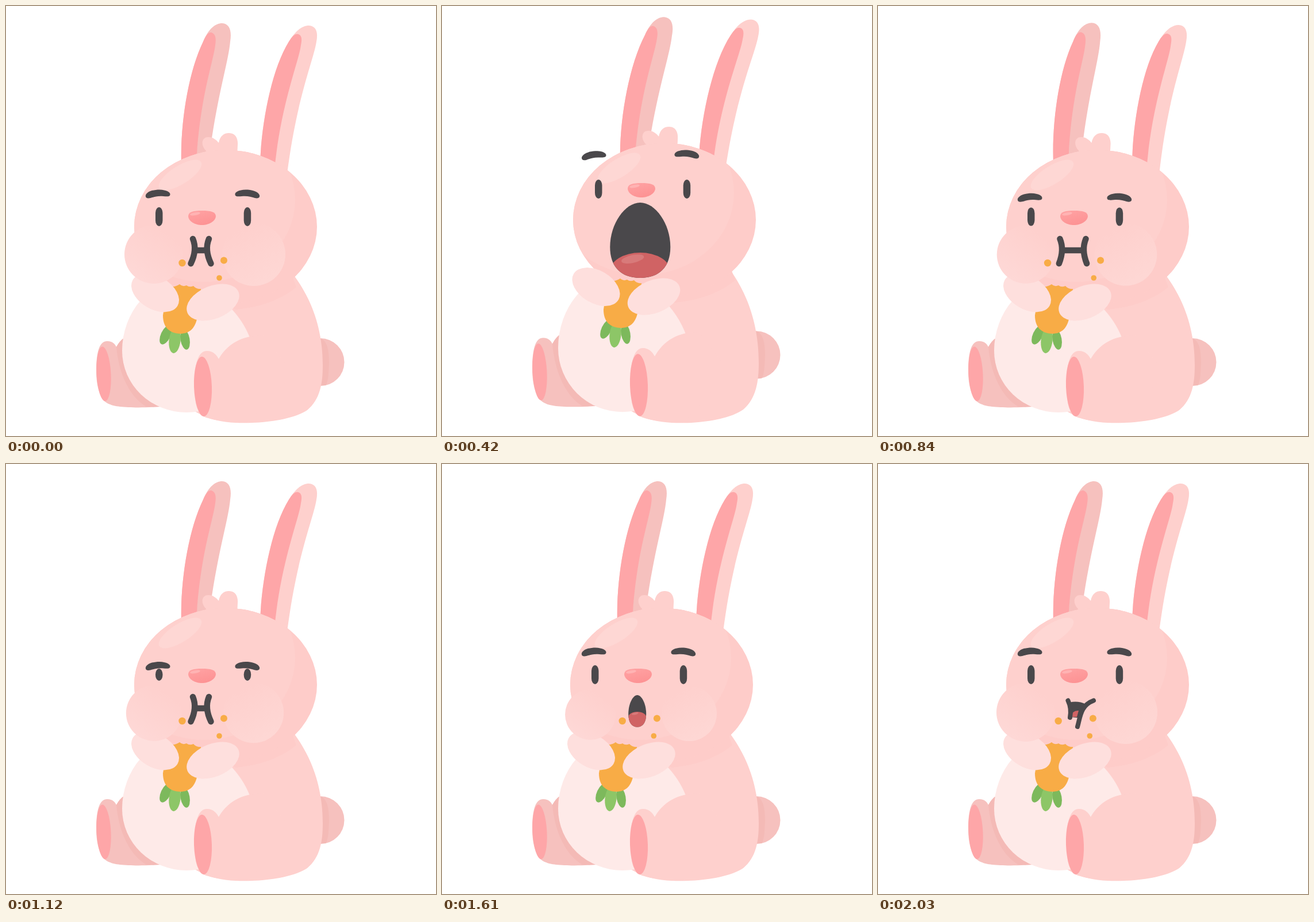
Animation of 748x748 px, one loop 2.1 s. Source, as an HTML page:

```html
<!DOCTYPE html>
<html lang="en">
<head>
<meta charset="utf-8">
<title>Rabbit eating a carrot</title>
<style>
  html, body { margin: 0; width: 100%; height: 100%; overflow: hidden; background: #fff; }
  svg { display: block; width: 100%; height: 100%; }
  .skin { fill: #fed0cd; }
  .shade { fill: #feccc9; }
  .back { fill: #f6c1be; }
  .backShade { fill: #f4bab6; }
  .pad { fill: #fea6a8; }
  .arm { fill: #fedfdd; }
  .ink { fill: #4a484b; }
  .line { fill: none; stroke: #4a484b; stroke-width: 10.5; stroke-linecap: round; stroke-linejoin: round; }
  .carrot { fill: #f8ac46; }
  .leaf { fill: #7db95c; }
  .tongue { fill: #d06364; }
</style>
</head>
<body>
<svg viewBox="0 0 748 748">
  <defs>
    <clipPath id="headClip"><ellipse cx="382" cy="384" rx="159" ry="133.5"/></clipPath>
    <clipPath id="eggClip"><path id="eggEdge"/></clipPath>
    <linearGradient id="cheekL" x1=".2" y1=".9" x2=".75" y2=".15">
      <stop offset="0" stop-color="#fed8d6"/><stop offset="1" stop-color="#fed0cd"/>
    </linearGradient>
    <linearGradient id="cheekR" x1=".7" y1=".9" x2=".3" y2=".1">
      <stop offset="0" stop-color="#fed7d4"/><stop offset="1" stop-color="#fed0cd"/>
    </linearGradient>
    <linearGradient id="noseFill" x1="0" y1="0" x2=".5" y2="1">
      <stop offset="0" stop-color="#ffa3a4"/><stop offset="1" stop-color="#fd9394"/>
    </linearGradient>
    <path id="brow" class="ink" d="M243 329C246 322 257 319.5 267 319.5C280 320 286 324 285.5 328C285 332 280 331.5 274 331C264 330 258 332 251 334C245 335.5 242 333 243 329Z"/>
  </defs>

  <g id="tail">
    <circle class="back" cx="547" cy="619.5" r="41.5"/>
    <path class="backShade" d="M547 578Q562 583 562 620Q561 655 556 660L535 659V580Z"/>
  </g>

  <g id="earL">
    <path class="back" d="M305 275C303 205 317 115 343 62C352 40 364 30 376 30C389 31 393 43 390 62C387 95 372 140 358 230L352 285Z"/>
    <path class="pad" d="M305 275C303 205 317 115 343 62Q350 45 357 46C364 48 366 55 364 68C360 100 337 160 331 275Z"/>
  </g>
  <g id="earR">
    <path class="skin" d="M442 275C444 205 462 110 492 62C504 42 516 34 527 34C540 35 543 46 540 62C535 95 505 160 488 300Z"/>
    <path class="pad" d="M442 275C444 205 462 110 492 62Q501 47 508 49C515 51 515 58 513 68C510 95 478 170 467 285Z"/>
  </g>

  <g id="body">
    <path class="back" d="M157 635C157 600 163 583 176 583C186 583 190 589 192 593Q198 582 206 577L290 640L270 697C225 700 190 698 181 693C163 688 157 660 157 635Z"/>
    <path class="backShade" d="M192 593Q198 582 206 577L290 640L270 697L244 697C215 680 196 640 192 593Z"/>
    <ellipse class="pad" cx="170" cy="640" rx="12.5" ry="47.5" transform="rotate(-3 170 640)"/>
    <path class="skin" d="M300 500L490 455C520 490 551 545 551 625C551 655 547 684 524 703C497 721 440 727 400 725C375 724 355 718 345 714L300 690Z"/>
    <path fill="#feeae8" d="M202 600A112 125 0 0 1 314 475C350 490 404 520 426 582V600A112 107 0 0 1 202 600Z"/>
    <path class="skin" d="M330 690C324 640 330 600 349 600C361 600 367 608 370 614C385 588 410 573 447 573L500 640L420 725C375 724 350 718 342 713C335 708 331 697 330 690Z"/>
    <ellipse class="pad" cx="342.5" cy="662" rx="15.5" ry="52" transform="rotate(-2 342 662)"/>
  </g>

  <path id="hair" class="skin" d="M346 265L348 252C338 242 340 228 352 228C360 228 366 233 370 238C372 227 378 221 388 221C400 221 404 232 403 242L402 262Z"/>
  <g id="head">
    <path class="shade" d="M495 462L505 489Q465 522 400 528L330 500Z"/>
    <g clip-path="url(#headClip)">
      <path class="shade" d="M200 230H560V530H200Z"/>
      <ellipse class="skin" cx="344.5" cy="337" rx="158.5" ry="143"/>
      <path class="skin" d="M215 240H480V340H215Z"/>
    </g>
    <ellipse fill="#fed7d4" cx="303" cy="294" rx="43" ry="16" transform="rotate(-32 303 294)"/>
  </g>

  <g id="carrot">
    <ellipse class="leaf" cx="278" cy="572" rx="8.5" ry="18" transform="rotate(25 278 572)"/>
    <ellipse class="leaf" cx="311.5" cy="580" rx="8" ry="18" transform="rotate(-10 311.5 580)"/>
    <ellipse fill="#8dc667" cx="293.5" cy="582" rx="10" ry="22" transform="rotate(6 293.5 582)"/>
    <path class="carrot" d="M287 488Q295 489 302 484Q307 489 314 486Q319 490 326 487Q331 493 339 492C336 520 336 535 332 545C328 562 318 570 303 570C283 569 273 558 273 538C275 520 284 505 287 488Z"/>
  </g>
  <ellipse id="armL" class="arm" rx="45" ry="28.5"/>
  <ellipse id="armR" class="arm" rx="48" ry="28.5"/>
  <circle id="cheekLeft" fill="url(#cheekL)"/>
  <circle id="cheekRight" fill="url(#cheekR)"/>

  <g id="face">
    <path fill="url(#noseFill)" d="M317 366C317 358 326 356 341 356C356 356 365 358 365 366C364 375 352 381 341 381C329 381 318 375 317 366Z"/>
    <ellipse fill="#ffb3b3" cx="329" cy="361.5" rx="9" ry="2.6" transform="rotate(-10 329 361.5)"/>
    <g id="openEyes">
      <rect class="ink eye" x="260" width="12.5" rx="6.2" ry="10"/>
      <rect class="ink eye" x="413.7" width="12.5" rx="6.2" ry="10"/>
    </g>
    <path id="shutEyes" class="line" d="M249 356C249 386 282 386 282 356M401.5 356C401.5 386 434.5 386 434.5 356"/>
  </g>
  <use id="browL" href="#brow"/>
  <use id="browR" href="#brow"/>

  <path id="bars" class="line"/>
  <g id="twist">
    <path class="ink" d="M333 415Q347 411 362 418L352 442L334 440Z"/>
    <path class="tongue" d="M336 440Q338 428 349 429L346 440Z"/>
    <path class="line" style="stroke-width: 8" d="M330.5 411.5Q337 425 334 441M375 411.5C352 420 352 440 347 457"/>
  </g>
  <g id="egg">
    <path id="eggFill" class="ink"/>
    <g clip-path="url(#eggClip)">
      <path id="tongue" class="tongue"/>
      <ellipse id="gloss" fill="#d87a7a"/>
    </g>
  </g>
  <path id="smile" class="line" d="M291 435Q332 463 374 435M288 443Q288 432 296 431.5M377 443Q377 432 368 431.5"/>

  <g id="crumbs" class="carrot">
    <circle cx="306.5" cy="447" r="6.2" data-drift="-12"/>
    <circle cx="379" cy="442.5" r="6" data-drift="8.5"/>
    <circle cx="371" cy="473" r="4.8" data-drift="4.5"/>
  </g>
</svg>

<script>
const STEP = 70, COUNT = 30, CHEW = 14;
const $ = id => document.getElementById(id);
const set = (el, attrs) => { for (const k in attrs) el.setAttribute(k, attrs[k]); };
const show = (id, on) => $(id).style.display = on ? "" : "none";
const move = (id, value) => $(id).setAttribute("transform", value);
const mix = (a, b, u) => a + (b - a) * u;

// Eased rise from 0 to 1 between steps a and b.
function ramp(i, a, b) {
  const u = Math.min(1, Math.max(0, (i - a) / (b - a)));
  return u * u * (3 - 2 * u);
}

function drawEgg(open) {
  const cx = mix(339.7, 344.8, open), top = mix(402, 342, open);
  const w = mix(15.5, 52.5, open), h = mix(55.5, 131, open);
  const wide = top + .59 * h, end = top + h;
  const d = `M${cx - w} ${wide}C${cx - w} ${top + .28 * h} ${cx - .5 * w} ${top} ${cx} ${top}`
    + `S${cx + w} ${top + .28 * h} ${cx + w} ${wide}C${cx + w} ${top + .86 * h} ${cx + .62 * w} ${end} ${cx} ${end}`
    + `S${cx - w} ${top + .86 * h} ${cx - w} ${wide}Z`;
  set($("eggFill"), { d });
  set($("eggEdge"), { d });
  const lip = top + mix(29, 87, open), y = lip + .62 * w;
  set($("tongue"), { d: `M${cx - w} ${y}A${w} ${.62 * w} 0 0 1 ${cx + w} ${y}V${end + 5}H${cx - w}Z` });
  const gx = cx - .25 * w, gy = lip + .21 * w;
  set($("gloss"), { cx: gx, cy: gy, rx: .38 * w, ry: .13 * w, transform: `rotate(-12 ${gx} ${gy})` });
}

// Two curved bars joined by a crossbar, width from 0 to 1.
function drawBars(width) {
  const c = 339, a = mix(14, 23, width), b = mix(17.5, 24.5, width);
  const bar = s => `M${c + s * a} 405Q${c + s * (a - 8)} 424 ${c + s * b} 448`;
  set($("bars"), { d: bar(-1) + bar(1) + `M${c - a + 4} 425H${c + a - 4}` });
}

function draw(i) {
  const open = ramp(i, 0, 6) - ramp(i, 7.5, 9);
  const bite = ramp(i, 7.5, 9) - ramp(i, 9, 12);
  const recoil = ramp(i, 10, 12) - ramp(i, 12, 14);
  const frown = ramp(i, 10, 16) - ramp(i, 16, 21);
  const away = ramp(i, 0, 4) - ramp(i, 9, 12);
  const lift = open - bite;
  const tilt = 1.4 * open + 2.5 * bite - recoil;

  // Offsets and turn of a part: at rest, added when open, added at the bite.
  const place = (id, rest, atOpen, atBite) => {
    const [x, y, turn] = rest.map((v, k) => v + open * atOpen[k] + bite * atBite[k]);
    move(id, `translate(${x} ${y}) rotate(${turn})`);
  };

  const shift = `translate(${5 * lift} ${-12 * lift})`;
  move("body", `translate(0 726) scale(1 ${1 + .04 * lift}) translate(0 -726)`);
  move("tail", `translate(0 ${-12.5 * open + 5.5 * bite})`);
  move("head", shift);
  move("hair", `translate(${5 * lift + 1.5 * Math.abs(tilt)} ${-11 * open + 9 * bite})`);
  move("earL", `${shift} rotate(${tilt} 330 268)`);
  move("earR", `${shift} rotate(${tilt} 465 275)`);
  move("carrot", `translate(${8 * open + 18 * bite} ${-10 * open - 33.5 * bite}) rotate(${-3 * bite} 305 530)`);
  place("armL", [259.5, 499, 30], [8.5, -10.5, 0], [13.5, -7.5, -49]);
  place("armR", [360, 515.5, -22], [8.5, -10, 0], [7.5, -13, 62]);

  const fx = 6 * open - 8 * bite, fy = -48 * open + 17 * bite;
  const shut = i === 9 || i === 10;
  move("face", `translate(${fx} ${fy})`);
  move("smile", `translate(${fx + 8 * bite} ${fy - 17 * bite})`);
  show("openEyes", !shut);
  show("shutEyes", shut);
  const half = 16.5 - 6 * frown * frown;
  document.querySelectorAll(".eye").forEach(e => set(e, { y: 366.5 - half, height: 2 * half }));

  const brow = -67 * open + 24.5 * frown;
  show("browL", !shut);
  show("browR", !shut);
  move("browL", `translate(0 ${brow}) rotate(${-3 * open} 264 327)`);
  move("browR", `translate(${684 + fx} ${brow - 2 * open}) scale(-1 1)`);

  // Two bites of the jaw per chew; the mouth gapes between them.
  const chew = ((i || COUNT) - 2) % CHEW;
  const width = (1 - Math.cos(4 * Math.PI * chew / CHEW)) / 2;
  const gape = Math.max(0, 1 - Math.abs(chew - 7) / 3);
  let mouth = gape > .5 ? "egg" : chew === CHEW - 1 ? "twist" : "bars";
  if (i > 0 && i < 9) mouth = "egg";
  if (shut) mouth = "smile";
  for (const id of ["egg", "twist", "smile", "bars"]) show(id, mouth === id);
  drawEgg(open);
  drawBars(width);

  const puff = -40 * away - 2.5 * frown - 7 * gape;
  const opacity = 1 - away;
  set($("cheekLeft"), { cx: 257 - .15 * puff, cy: 432 - .55 * puff, r: 51 + puff, opacity });
  set($("cheekRight"), { cx: 431 + .15 * puff, cy: 432 - .3 * puff, r: 55 + puff, opacity });

  const spread = mouth === "bars" ? width : -.6;
  show("crumbs", i < 2 || i > 10);
  for (const c of $("crumbs").children) set(c, { transform: `translate(${c.dataset.drift * spread})` });
}

const start = performance.now();
function tick() {
  draw(Math.floor((performance.now() - start) / STEP) % COUNT);
  requestAnimationFrame(tick);
}
tick();
</script>
</body>
</html>
```
